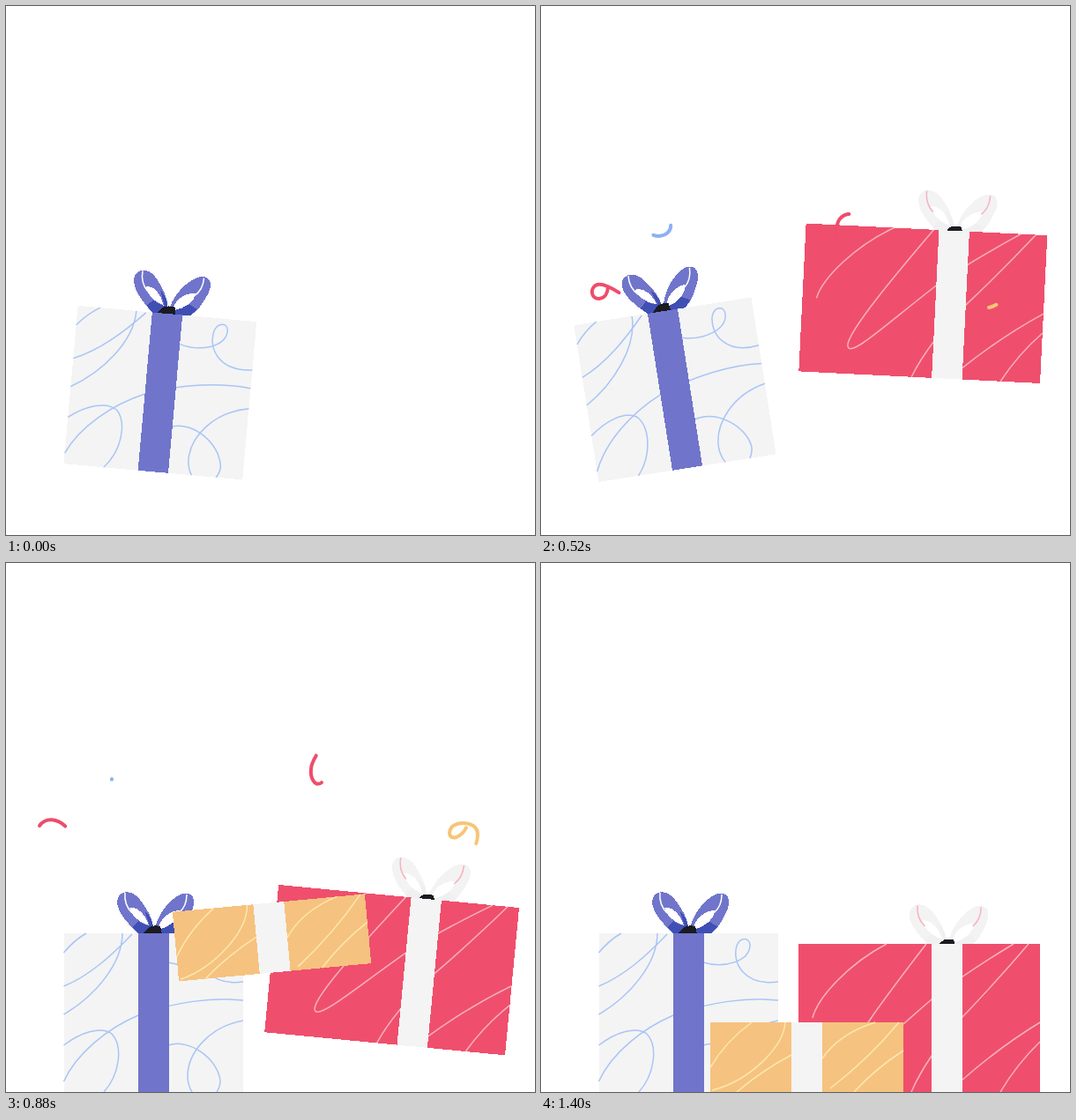
An HTML page that plays this animation: 600 px wide and 600 px high, repeating every 2 s.

```html
<!DOCTYPE html>
<html lang="en">
<head>
<meta charset="utf-8">
<title>Gift boxes</title>
<style>
  html, body { margin: 0; height: 100%; overflow: hidden; background: #fff; }
  svg { display: block; width: 100vw; height: 100vh; }
  .gift { shape-rendering: crispEdges; }
  .lines { fill: none; stroke-width: 1.5; shape-rendering: auto; }
  .streamer { fill: none; stroke-width: 4; stroke-linecap: round; }
  .loop { fill: var(--loop); }
  .shade { fill: var(--shade); }
  .shine { stroke: var(--shine); }
</style>
</head>
<body>
<svg viewBox="0 0 600 600">
  <defs>
    <g id="bow">
      <path class="loop" d="M165 420H150C138 409 126 396 126 384C127 371 142 369 152 382C160 392 167 404 167 414Z
        M168 419C170 402 184 381 200 375C214 372 216 385 210 396C205 407 201 414 193 420Z"/>
      <path class="shade" d="M143 413L150 406Q157 411 163 411L157 394Q167 404 167 414L165 420H150Z
        M168 420L172 416Q184 412 189 406L200 412L193 420Z"/>
      <path fill="#fff" d="M162 411C150 408 141 398 140 391C149 389 158 398 162 411Z
        M173 416C173 404 186 394 197 394C197 403 188 412 173 416Z"/>
      <path class="lines shine" d="M135 374C134 384 137 391 143 397M205 376C205 386 202 392 196 397"/>
      <path fill="#1b1b22" d="M155 421L161 414Q166 410 175 412L177 421Z"/>
    </g>
  </defs>

  <g id="blue" class="gift" style="--loop:#7075cb;--shade:#3f4fb4;--shine:#fff">
    <use href="#bow"/>
    <path fill="#f4f4f4" d="M65.500 420H269V600H65.500Z"/>
    <path class="lines" stroke="#a9c5f6" d="M65.500 442Q77 428 91 420M65.500 480C95 468 120 445 143 421
      M65.500 512C100 492 132 455 132 420M65.500 588C80 556 115 528 150 513C190 498 235 492 269 496
      M65.500 547C85 532 108 525 120 534C133 548 129 580 111 600
      M184 453C208 460 236 452 237 434C237 424 226 424 222 434C216 455 232 480 269 475
      M184 547C208 539 240 562 243 587Q243 594 239 600M269 519C230 526 206 556 206 582Q206 592 211 600"/>
    <path fill="#7075cb" d="M150 420H184.500V600H150Z"/>
  </g>

  <g id="red" class="gift" style="--loop:#f3f3f3;--shade:#f0f0f1;--shine:#f7b3c0">
    <use href="#bow" transform="translate(288 3) scale(1.03)"/>
    <path fill="#ef4f6d" d="M292 432H566V600H292Z"/>
    <path class="lines" stroke="#f8b1bc" d="M308 516C314 492 350 454 392 432
      M437 432C400 480 345 552 346 568C348 584 390 540 443 495Q477 468 536 432
      M553 432C525 465 500 492 477 516C455 540 432 572 420 600
      M566 521Q520 549 477 587M566 543Q540 568 521 600"/>
    <path fill="#f4f4f4" d="M443 432H477.500V600H443Z"/>
  </g>

  <g id="yellow" class="gift">
    <path fill="#f6c27f" d="M192 521H411V600H192Z"/>
    <path class="lines" stroke="#fce8ae" d="M192 572Q210 542 239 521M277 521C275 550 235 588 194 598
      M284 558Q250 576 222 600M319 562Q338 534 379 521M406 521Q372 562 328 596M411 553Q380 573 355 600"/>
    <path fill="#f4f4f4" d="M284 521H319V600H284Z"/>
  </g>
</svg>
<script>
const FRAME = 40, LOOP = 2000, DRAW_TIME = 650, ERASE_TIME = 720;

// A gift rises to its peak and falls, while swaying from one tilt to the other.
const gifts = [
  { id: 'blue', pivot: '65.5 600', start: -20, peak: 320, sway: 540, height: 102, rise: 703, fall: 312, tilt: 5.2, lean: -9 },
  { id: 'red', pivot: '566 600', start: 120, peak: 425, sway: 840, height: 178, rise: 518, fall: 520, tilt: -4.5, lean: 8 },
  { id: 'yellow', pivot: '301.5 560.5', start: 560, peak: 790, sway: 790, height: 155, rise: 254, fall: 254, tilt: 6, lean: -7.4 },
];

// A streamer is drawn along its path, then erased from its beginning.
const streamers = [
  { color: '#ee4d6b', drawn: 160, erased: 400,
    d: 'M96 330C84 322 72 314 64 316C55 319 56 332 66 332C76 331 78 318 74 308C68 294 48 284 38 298' },
  { color: '#8db0f5', drawn: 80, erased: 200,
    d: 'M137 262C133 250 138 241 144 243C150 248 148 259 134 261C124 261 119 254 120 245' },
  { color: '#ee4d6b', drawn: 260, erased: 490,
    d: 'M336 262C333 248 338 238 348 236C360 235 363 243 358 249C350 255 345 243 346 234C346 229 349 223 352 218' },
  { color: '#f7c577', drawn: 415, erased: 640,
    d: 'M508 342C520 340 535 325 535 308C535 294 515 292 506 299C500 307 504 313 511 311C524 305 529 288 518 275' },
];

// Sine ease in and out from 0 to 1 over the given span of time.
function ease(t, start, duration) {
  const u = Math.min(1, Math.max(0, (t - start) / duration));
  return (1 - Math.cos(Math.PI * u)) / 2;
}

for (const gift of gifts) gift.node = document.getElementById(gift.id);
for (const streamer of streamers) {
  const node = document.createElementNS('http://www.w3.org/2000/svg', 'path');
  const attributes = { class: 'streamer', d: streamer.d, stroke: streamer.color, pathLength: 100 };
  for (const name in attributes) node.setAttribute(name, attributes[name]);
  document.querySelector('svg').append(node);
  streamer.node = node;
}

function drawGift({ node, pivot, start, peak, sway, height, rise, fall, tilt, lean }, t) {
  const land = peak + fall;
  const u = (t - peak) / (t < peak ? rise : fall);
  const lift = t < land ? height * (1 - u * u) : 0;
  const angle = (tilt + (lean - tilt) * ease(t, start, sway - start)) * (1 - ease(t, sway, land - sway));
  node.style.display = t < start ? 'none' : '';
  node.setAttribute('transform', `translate(0 ${-lift}) rotate(${angle} ${pivot})`);
}

function drawStreamer({ node, drawn, erased }, t) {
  const tail = 100 * ease(t, erased, ERASE_TIME);
  const length = 100 * ease(t, drawn, DRAW_TIME) - tail;
  node.style.display = length > 0 ? '' : 'none';
  node.setAttribute('stroke-dasharray', `${length} 300`);
  node.setAttribute('stroke-dashoffset', -tail);
}

const began = performance.now();
function tick() {
  const elapsed = (performance.now() - began) % LOOP;
  const t = Math.floor(elapsed / FRAME) * FRAME;
  for (const gift of gifts) drawGift(gift, t);
  for (const streamer of streamers) drawStreamer(streamer, t);
  requestAnimationFrame(tick);
}
tick();
</script>
</body>
</html>
```
